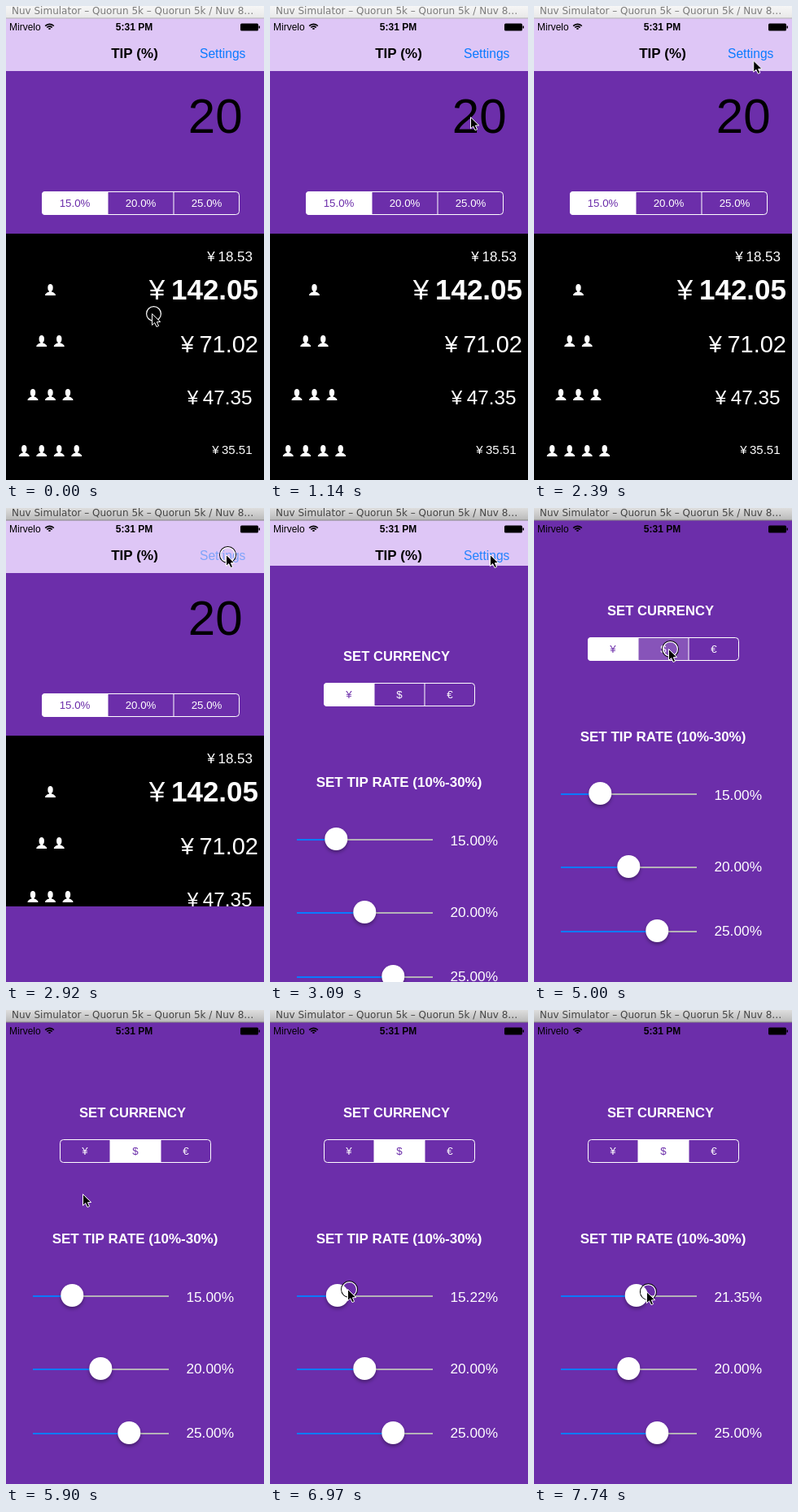
These frames come from a looping animation (317x583 px, 8 s). An HTML page with a canvas:

```html
<!DOCTYPE html>
<html lang="en">
<head>
<meta charset="utf-8">
<title>Tip calculator</title>
<style>
html, body { margin: 0; width: 100%; height: 100%; overflow: hidden; background: #000; }
canvas { display: block; }
</style>
</head>
<body>
<canvas id="stage" width="317" height="583"></canvas>
<script>
const ctx = document.getElementById('stage').getContext('2d');
const LOOP = 8000, STEP = 87;
const PURPLE = '#6c2eaa', LILAC = '#dec6f6', BLUE = '#0a7aff';
const SANS = '"Liberation Sans", Arial, sans-serif';
const BILL = 142.05;

const SHEET_OPEN = 2840, PICK = 5000, DRAG = 6880, DRAG_END = 7660;
const HOME = [179, 378];
const MOVES = [
  { start: 440, end: 610, to: [200, 269] },
  { start: 880, end: 1310, to: [269, 70] },
  { start: 2390, end: 2660, to: [270, 57] },
  { start: 3270, end: 3620, to: [269, 109] },
  { start: 3710, end: 4460, to: [178, 150], via: [[240, 427], [10, 418]] },
  { start: 4550, end: 4820, to: [165, 173] },
  { start: 5090, end: 5360, to: [94, 226] },
  { start: 5990, end: 6430, to: [93.5, 343] }
];

// The screen refreshes in even steps; each stretch of motion counts its own
const stepCount = (a, b) => Math.round((b - a) / STEP);
const stepAt = (t, a, b) => {
  const n = stepCount(a, b);
  return t < a ? -1 : Math.min(n, Math.floor((t - a) / (b - a) * n + 0.15));
};
const progress = (t, a, b) => (stepAt(t, a, b) + 1) / (stepCount(a, b) + 1);
const smooth = p => p * p * (3 - 2 * p);
const mix = (a, b, p) => a.map((v, i) => v + (b[i] - v) * p);

// Bézier curve of any degree
function bezier(points, p) {
  if (points.length === 1) return points[0];
  return bezier(points.slice(1).map((b, i) => mix(points[i], b, p)), p);
}

function rect(color, x, y, w, h) {
  ctx.fillStyle = color;
  ctx.fillRect(x, y, w, h);
}

function text(str, x, y, size, color, align = 'left', weight = 'normal', family = SANS) {
  ctx.font = `${weight} ${size}px ${family}`;
  ctx.textAlign = align;
  ctx.fillStyle = color;
  ctx.fillText(str, x, y);
}

function titleBar(active) {
  const shade = ctx.createLinearGradient(0, 0, 0, 15);
  shade.addColorStop(0, active ? '#dedede' : '#f6f6f6');
  shade.addColorStop(1, active ? '#b9b9b9' : '#e8e8e8');
  rect(shade, 0, 0, 317, 15);
  rect(active ? '#858585' : '#b4b4b4', 0, 14.5, 317, 1);
  text('Nuv Simulator – Quorun 5k – Quorun 5k / Nuv 8…', 7, 10, 12,
    active ? '#444' : '#7b7b7b', 'left', 'normal', '"DejaVu Sans", sans-serif');
}

function statusBar() {
  text('Mirvelo', 4, 30, 12, '#000');
  text('5:31 PM', 157.5, 30, 12, '#000', 'center', 'bold');
  ctx.strokeStyle = '#000';
  ctx.lineWidth = 1.7;
  for (const r of [1.5, 4.4, 7.2]) {
    ctx.beginPath();
    ctx.arc(53.5, 29.5, r, -Math.PI * 0.76, -Math.PI * 0.24);
    ctx.stroke();
  }
  ctx.fillStyle = '#000';
  ctx.beginPath();
  ctx.roundRect(288, 21.5, 22, 9, 1.5);
  ctx.fill();
  rect('#000', 310.5, 24.5, 1.5, 3);
}

function segments(x, y, width, labels, selected, pressed = -1) {
  const edge = i => x + Math.round(width * i / labels.length);
  ctx.save();
  ctx.beginPath();
  ctx.roundRect(x, y, width, 29, 4);
  ctx.clip();
  labels.forEach((label, i) => {
    const left = edge(i), w = edge(i + 1) - left, on = i === selected;
    if (on) rect('#fff', left, y, w, 29);
    if (i === pressed) rect('rgba(255,255,255,0.18)', left, y, w, 29);
    if (i) rect('#fff', left - 0.5, y, 1, 29);
    text(label, left + w / 2, y + 19, 13.3, on ? PURPLE : '#fff', 'center');
  });
  ctx.restore();
  ctx.strokeStyle = '#fff';
  ctx.lineWidth = 1;
  ctx.beginPath();
  ctx.roundRect(x + 0.5, y + 0.5, width - 1, 28, 4);
  ctx.stroke();
}

function person(x, bottom) {
  ctx.fillStyle = '#fff';
  ctx.beginPath();
  ctx.ellipse(x, bottom - 9.5, 3.2, 4.5, 0, 0, Math.PI * 2);
  ctx.fill();
  ctx.fillRect(x - 1.5, bottom - 6, 3, 3);
  ctx.beginPath();
  ctx.moveTo(x - 6.5, bottom);
  ctx.quadraticCurveTo(x - 6.5, bottom - 3, x - 1.5, bottom - 4.5);
  ctx.lineTo(x + 1.5, bottom - 4.5);
  ctx.quadraticCurveTo(x + 6.5, bottom - 3, x + 6.5, bottom);
  ctx.fill();
}

function amount(value, right, middle, size, weight) {
  const str = (value - 0.001).toFixed(2), y = middle + size * 0.36;
  text(str, right, y, size, '#fff', 'right', weight);
  const left = right - ctx.measureText(str).width;
  text('¥', left - size / 2, y, size, '#fff', 'center');
}

function shares() {
  amount(18.53, 303, 307.5, 17);
  [35, 29, 24.3, 15].forEach((size, i) => {
    amount(BILL / (i + 1), i < 2 ? 310 : 302.5, 348 + 68 * i - 0.7 * i * i, size, i ? 'normal' : 'bold');
    const bottom = 356 + 63 * i + 1.5 * i * (i - 1);
    for (let k = 0; k <= i; k++) person(54.5 + (k - i / 2) * 21.5, bottom);
  });
}

function calculator(linkAlpha) {
  rect(LILAC, 0, 15, 317, 65);
  text('TIP (%)', 158, 64, 17, '#000', 'center', 'bold');
  ctx.globalAlpha = linkAlpha;
  text('Settings', 238, 64, 15.6, BLUE);
  ctx.globalAlpha = 1;
  rect(PURPLE, 0, 80, 317, 200);
  text('20', 290.5, 156, 60, '#000', 'right');
  segments(44, 228, 243, ['15.0%', '20.0%', '25.0%'], 0);
  rect('#000', 0, 280, 317, 303);
  shares();
}

function slider(y, labelY, value) {
  const x = 81.3 + 7 * (value - 15);
  rect('#b5b2b8', 33, y, 167, 2);
  rect(BLUE, 33, y, x - 33, 2);
  ctx.save();
  ctx.shadowColor = 'rgba(0,0,0,0.35)';
  ctx.shadowBlur = 4;
  ctx.shadowOffsetY = 2.5;
  ctx.fillStyle = '#fff';
  ctx.beginPath();
  ctx.arc(x, y, 14, 0, Math.PI * 2);
  ctx.fill();
  ctx.restore();
  text(value.toFixed(2) + '%', 280, labelY, 17.3, '#fff', 'right');
}

function settings(offset, selected, pressed, rate) {
  ctx.save();
  ctx.translate(0, offset);
  rect(PURPLE, 0, 15, 317, 568);
  text('SET CURRENCY', 155.5, 132, 16.6, '#fff', 'center', 'bold');
  segments(66, 159, 186, ['¥', '$', '€'], selected, pressed);
  text('SET TIP RATE (10%-30%)', 158.5, 287, 17, '#fff', 'center', 'bold');
  slider(351, 359, rate);
  slider(441, 447, 20);
  slider(520, 526, 25);
  ctx.restore();
}

function ring(x, y, r, color) {
  ctx.strokeStyle = color;
  ctx.lineWidth = 1.2;
  ctx.beginPath();
  ctx.arc(x, y, r, 0, Math.PI * 2);
  ctx.stroke();
}

function cursor(x, y, pressed) {
  if (pressed) {
    ring(x + 2.5, y + 0.5, 9.9, '#000');
    ring(x + 2.5, y + 0.5, 8.9, '#fff');
  }
  const arrow = [[0.5, 0.5], [0.5, 14.5], [3.7, 11.6], [6, 16.5], [8.6, 15.4], [6.4, 10.7], [10.7, 10.5]];
  ctx.beginPath();
  arrow.forEach(([dx, dy]) => ctx.lineTo(x + dx, y + dy));
  ctx.closePath();
  ctx.fillStyle = '#000';
  ctx.fill();
  ctx.strokeStyle = '#fff';
  ctx.lineWidth = 1;
  ctx.stroke();
}

function pointer(t, rate) {
  let at = HOME;
  for (const { start, end, to, via = [] } of MOVES) {
    if (t >= start) at = bezier([at, ...via, to], progress(t, start, end));
  }
  const drag = rate - 15;
  return [at[0] + 7 * drag, at[1] + drag / 2];
}

// Critically damped spring for the sheet sliding up
function sheetOffset(t) {
  const step = stepAt(t, SHEET_OPEN, 3620);
  if (step < 1) return 568;
  const s = 18.26 * (step * STEP / 1000 - 0.0474);
  return Math.round(568 * (1 + s) * Math.exp(-s));
}

function tipRate(t) {
  const p = Math.max(0, stepAt(t, DRAG, DRAG_END)) / stepCount(DRAG, DRAG_END);
  return 15 + 6.35 * smooth(p);
}

function draw(t) {
  const offset = sheetOffset(t), rate = tipRate(t);
  const picking = t >= PICK && t < PICK + 90;
  const pressed = t < 80 || picking || t >= DRAG || (t >= SHEET_OPEN && t < SHEET_OPEN + 90);
  const linkAlpha = t < SHEET_OPEN ? 1 : Math.min(1, 0.25 + (t - SHEET_OPEN) / 400);
  if (offset > 0) calculator(linkAlpha);
  if (offset < 568) settings(offset, t < PICK + 90 ? 0 : 1, picking ? 1 : -1, rate);
  statusBar();
  titleBar(t >= SHEET_OPEN);
  cursor(...pointer(t, rate), pressed);
}

function tick() {
  draw(performance.now() % LOOP);
  requestAnimationFrame(tick);
}
tick();
</script>
</body>
</html>
```
